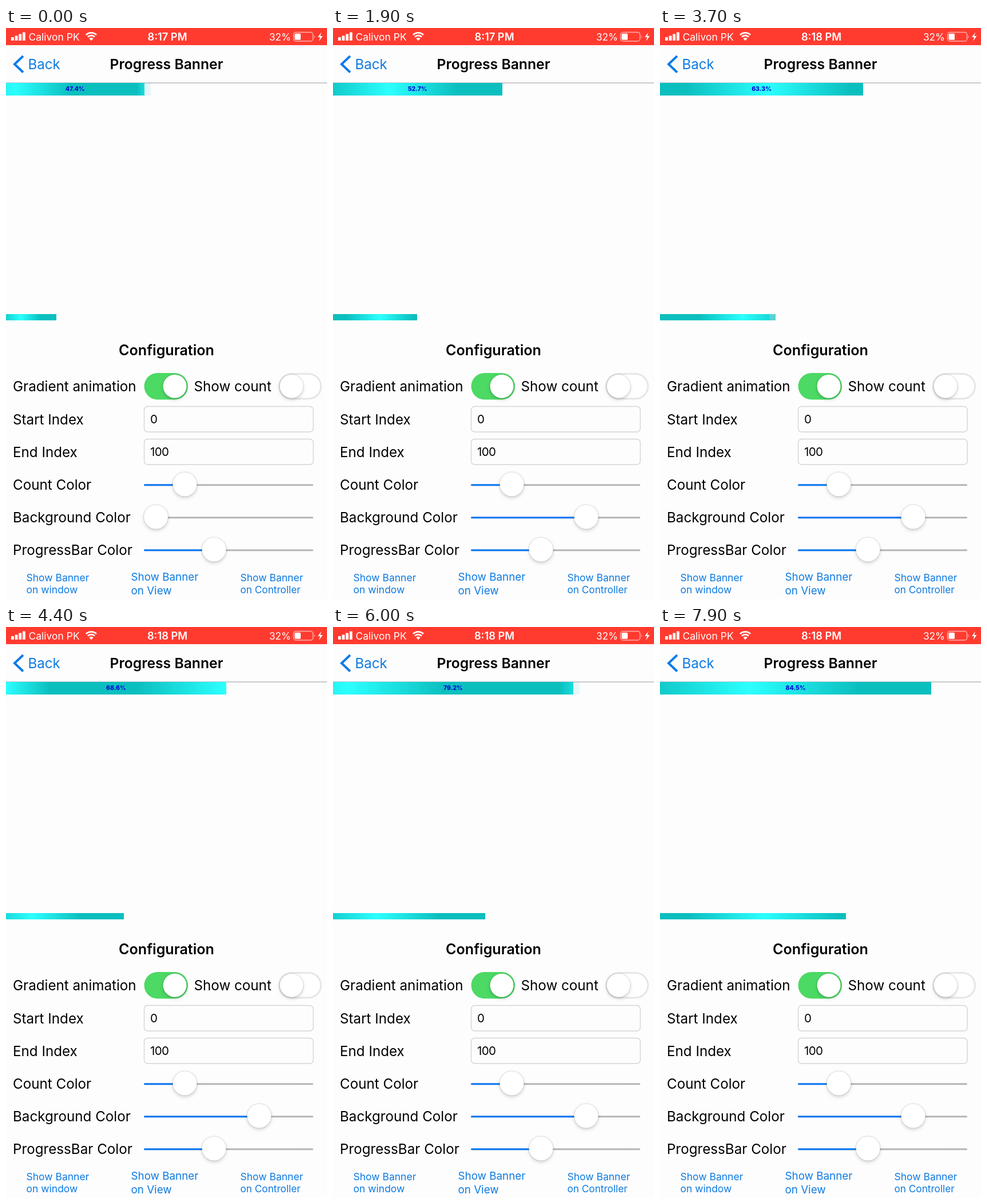
These frames come from a looping animation (561 px wide and 998 px high, 8 s). An HTML page:

```html
<!DOCTYPE html>
<html lang="en">
<head>
<meta charset="utf-8">
<title>Progress Banner</title>
<style>
  html, body { margin: 0; width: 100%; height: 100%; overflow: hidden; background: #fefdfe; }
  svg { position: absolute; left: 0; top: 0; font: 24.2px Inter, "Open Sans", sans-serif; }
  .bar { position: absolute; left: 0; }
  .bar i { position: absolute; left: 100%; top: 0; height: 100%; background: #0cbfbf; }
  #top { top: 96px; height: 22px; }
  #low { top: 500px; height: 11px; }
  #count { position: absolute; inset: 0; text-align: center; color: #0808d8;
    font: 800 10.5px/22px Inter, "Open Sans", sans-serif; }
  .link { fill: #0d7be0; }
  .knob { fill: #fff; filter: drop-shadow(0 3px 3px #0002) drop-shadow(0 0 1px #0004); }
  .field { fill: #fefdfe; stroke: #d4d4d8; stroke-width: 1.4; }
</style>
</head>
<body>
<svg width="561" height="998" viewBox="0 0 561 998">
  <rect width="561" height="30" fill="#ff3b30"/>
  <g fill="#fff" font-size="17.5">
    <path d="M9 16h4.8v6H9zM15.7 13.5h4.8V22h-4.8zM22.4 10.5h4.8V22h-4.8zM29 7.5h4.8V22H29z"/>
    <text x="39.5" y="22">Calivon PK</text>
    <path d="M140 12a13 13 0 0 1 18 0M143 15.5a8.7 8.7 0 0 1 12 0" fill="none" stroke="#fff" stroke-width="2.8"/>
    <path d="M145.4 18.4a5 5 0 0 1 7.2 0L149 22.3z"/>
    <text id="clock" x="282" y="22" text-anchor="middle" font-weight="600" font-size="18.3"></text>
    <text x="460" y="22" font-size="17.2">32%</text>
    <rect x="502.5" y="7.5" width="34" height="15.5" rx="4" fill="none" stroke="#fff" stroke-opacity=".6" stroke-width="1.4"/>
    <rect x="504.5" y="9.8" width="10.5" height="11" rx="1.5"/>
    <path d="M538.5 12.5q2.5 2.5 0 5.5z" opacity=".6"/>
    <path d="M551 7.5l-6 8.5h4l-2 7 6.5-9h-4.3z"/>
  </g>
  <path d="M0 96H561" stroke="#b9b9bc" stroke-width="1.5"/>
  <path d="M30 49L15 63.2 30 77.5" fill="none" stroke="#0d7bea" stroke-width="4"/>
  <text class="link" x="38.5" y="72" font-size="24.1">Back</text>
  <g font-weight="600" text-anchor="middle">
    <text x="280.5" y="71.5" font-size="24.7">Progress Banner</text>
    <text x="280.5" y="572" font-size="25.1">Configuration</text>
  </g>
  <text x="12" y="635">Gradient animation</text>
  <text x="328.5" y="635">Show count</text>
  <text x="12" y="692.5">Start Index</text>
  <text x="12" y="749.5">End Index</text>
  <rect x="241.5" y="603" width="76.5" height="46.5" rx="23.2" fill="#4cd964"/>
  <circle class="knob" cx="295" cy="626.2" r="20.5"/>
  <rect x="477.5" y="604.5" width="73" height="43.5" rx="21.7" fill="#fff" stroke="#e6e5ea" stroke-width="3"/>
  <circle class="knob" cx="499" cy="626.2" r="20.5"/>
  <rect class="field" x="241.5" y="661.5" width="295.5" height="44.5" rx="6"/>
  <rect class="field" x="241.5" y="718.5" width="295.5" height="44.5" rx="6"/>
  <g font-size="20.5" letter-spacing="-.6"><text x="252" y="691">0</text><text x="252" y="748">100</text></g>
  <g id="sliders"></g>
  <g class="link" font-size="17.5">
    <text x="35.5" y="967">Show Banner</text><text x="35.5" y="988">on window</text>
    <text x="409.5" y="967">Show Banner</text><text x="409.5" y="988" font-size="17.2">on Controller</text>
  </g>
  <g class="link" font-size="18.8">
    <text x="218.5" y="966">Show Banner</text><text x="218.5" y="989.5">on View</text>
  </g>
</svg>
<div class="bar" id="top"><i></i><span id="count"></span></div>
<div class="bar" id="low"><i></i></div>
<script>
const $ = id => document.getElementById(id);
const LOOP = 8000, STEP = 1000, SLIDE = 200, SWEEP = 1500;

const slider = (label, x, y) => `<text x="12" y="${y + 9}">${label}</text>
  <g stroke-width="3" stroke-linecap="round">
    <path d="M242.5 ${y + 1.3}H535.5" stroke="#b5b4b9"/>
    <path class="fill" d="M242.5 ${y + 1.3}H${x}" stroke="#0a78f5"/>
  </g><circle class="knob" cx="${x}" cy="${y}" r="21"/>`;
$('sliders').innerHTML = [['Count Color', 312.5, 797.5], ['Background Color', 262, 854.5],
  ['ProgressBar Color', 363.5, 911.5]].map(s => `<g>${slider(...s)}</g>`).join('');
const background = $('sliders').children[1];

function setBackground(x) {
  background.querySelector('.fill').setAttribute('d', `M242.5 855.8H${x}`);
  background.querySelector('.knob').setAttribute('cx', x);
}

const glow = (center, reach) => `linear-gradient(90deg, #2cffff00 ${(center - reach) * 100}%,
  #2cffff ${center * 100}%, #2cffff00 ${(center + reach) * 100}%)`;

// Each bar slides one step a second while a highlight sweeps across it.
function drawBar(bar, t, first, step, lag, offset) {
  const n = Math.floor((t + lag) / STEP);
  const p = Math.min(1, (t + lag) % STEP / SLIDE);
  const rest = step * (1 - p);
  const c = (offset + t / SWEEP) % 1;
  bar.style.width = first + n * step - rest + 'px';
  bar.style.background = `${glow(c, .4)}, ${glow(c - 1, .2)}, ${glow(c + 1, .12)}, #0cbfbf`;
  const edge = bar.firstElementChild.style;
  edge.width = Math.min(11, rest * .8) + 'px';
  edge.opacity = Math.min(.75, 3 * p * p);
  return n;
}

function draw(now) {
  const t = now % LOOP;
  const n = drawBar($('top'), t, 265.9, 29.73, 35, .063);
  drawBar($('low'), t, 87.8, 29.65, 394, .29);
  $('count').textContent = (47.4 + 5.3 * n).toFixed(1) + '%';
  $('clock').textContent = t < 2800 ? '8:17 PM' : '8:18 PM';
  const k = Math.max(0, Math.min(1, (t - 1200) / 600));
  setBackground(262 + 180.5 * k * k * (3 - 2 * k));
  requestAnimationFrame(draw);
}
draw(0);
</script>
</body>
</html>
```
